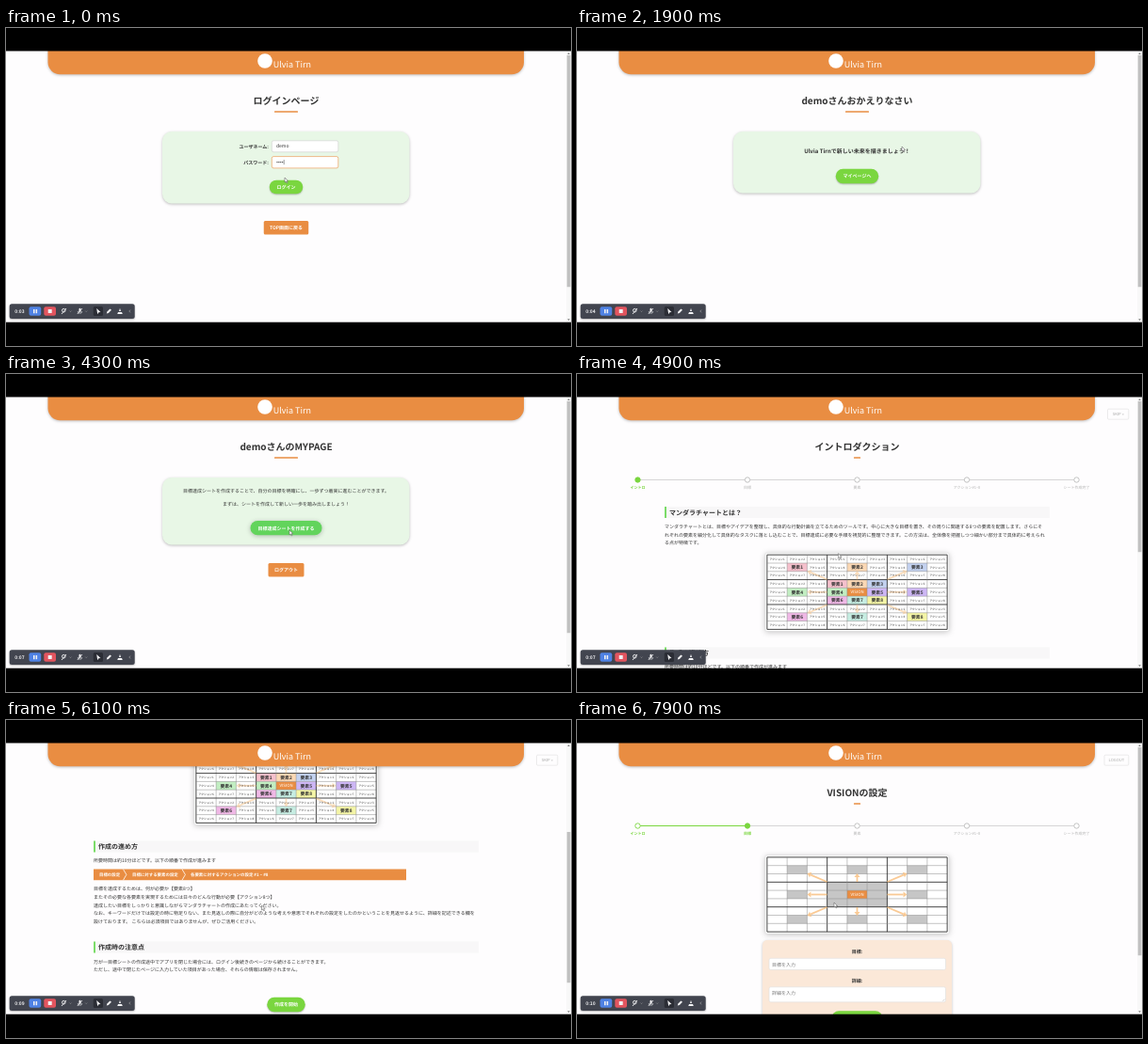
These frames come from a looping animation (600 px wide and 338 px high, 8000 ms). An HTML page with a canvas:

```html
<!DOCTYPE html>
<html>
<head>
<meta charset="utf-8">
<title>Goal sheet walkthrough</title>
<style>
  html, body { margin: 0; width: 100%; height: 100%; overflow: hidden; background: #000; }
  canvas { display: block; width: 600px; height: 338px; }
</style>
</head>
<body>
<canvas id="stage"></canvas>
<script>
const LOOP = 8000, STEP = 100, MID = 297.5;
const VIEW = { top: 24.5, bottom: 312.7, height: 288 };
const FONT = '"Noto Sans CJK JP", "Noto Sans CJK", "Noto Sans", sans-serif';
const INK = '#333', ORANGE = '#e98d42', GREEN = '#7ad63f', HOVER = '#62d45c', GREY = '#b5b5b5';
const BRAND = 'Ulvia Tirn', USER = 'demo';

const canvas = document.getElementById('stage');
const ratio = window.devicePixelRatio || 1;
canvas.width = 600 * ratio;
canvas.height = 338 * ratio;
const ctx = canvas.getContext('2d');
ctx.scale(ratio, ratio);
ctx.textBaseline = 'middle';
ctx.textRendering = 'geometricPrecision';

// Rows of [time, value, value...], linear in between
const CURSOR = [
  [0, 296, 159], [300, 297, 167], [700, 297, 167], [1900, 345, 126], [2300, 300, 157],
  [2800, 300, 157], [3600, 301, 166], [4500, 301, 166], [5000, 271.5, 197],
  [6800, 271.5, 197], [7200, 292, 251], [7500, 292, 251], [7800, 273, 194]
];
const SCROLL = [
  [4900, 0], [5100, 93], [5400, 93], [5600, 125], [5800, 125], [6100, 162], [6500, 212]
];

function sample(keys, t) {
  const next = keys.findIndex(k => k[0] > t);
  if (next < 0) return keys[keys.length - 1].slice(1);
  if (next === 0) return keys[0].slice(1);
  const a = keys[next - 1], b = keys[next], f = (t - a[0]) / (b[0] - a[0]);
  return a.slice(1).map((v, i) => v + (b[i + 1] - v) * f);
}

let cursor, scroll;

function label(s, x, y, size = 5, weight = 500, color = INK, align = 'left') {
  ctx.font = `${weight} ${size}px ${FONT}`;
  ctx.fillStyle = color;
  ctx.textAlign = align;
  ctx.fillText(s, x, y);
}
const centered = (s, y, size, weight, color, x = MID) => label(s, x, y, size, weight, color, 'center');

function box(x, y, w, h, r, fill, { stroke, shadow = 0, line = 0.6 } = {}) {
  ctx.save();
  ctx.beginPath();
  ctx.roundRect(x, y, w, h, r);
  if (shadow) {
    ctx.shadowColor = 'rgba(0,0,0,.25)';
    ctx.shadowBlur = shadow * ratio;
    ctx.shadowOffsetY = ratio;
  }
  ctx.fillStyle = fill;
  ctx.fill();
  ctx.restore();
  if (stroke) {
    ctx.strokeStyle = stroke;
    ctx.lineWidth = line;
    ctx.stroke();
  }
}

function path(points, color, width, fill) {
  ctx.beginPath();
  points.forEach(([x, y]) => ctx.lineTo(x, y));
  if (fill) {
    ctx.closePath();
    ctx.fillStyle = fill;
    ctx.fill();
  }
  if (color) {
    ctx.strokeStyle = color;
    ctx.lineWidth = width;
    ctx.stroke();
  }
}

function circle(x, y, r, fill, stroke) {
  ctx.beginPath();
  ctx.arc(x, y, r, 0, Math.PI * 2);
  ctx.fillStyle = fill;
  ctx.fill();
  if (stroke) {
    ctx.strokeStyle = stroke;
    ctx.lineWidth = 0.9;
    ctx.stroke();
  }
}

function pill(s, y, w, h = 15.3) {
  const over = Math.abs(cursor[0] - MID) < w / 2 && Math.abs(cursor[1] + scroll - y) < h / 2;
  box(MID - w / 2, y - h / 2, w, h, h / 2, over ? HOVER : GREEN, { shadow: over ? 5 : 1.5 });
  centered(s, y, 5, 700, '#fff');
}

function backButton(s, y, w) {
  box(MID - w / 2, y - 7.2, w, 14.4, 1.5, ORANGE);
  centered(s, y, 5, 700, '#fff');
}

function title(s, age) {
  centered(s, 77, 10, 700);
  const w = 25 * Math.min(1, age / 1400);
  box(MID - w / 2, 88.2, w, 1.6, 0.5, ORANGE);
}

const panel = h => box(166, 110, 262.5, h, 10, '#e8f7e6', { shadow: 3 });

function input(x, y, w, h, stroke = '#ccc') {
  box(x, y, w, h, 1.8, '#fff', { stroke });
}

function stepper(active) {
  const names = ['イントロ', '目標', '要素', 'アクション#1~8', 'シート作成完了'];
  const xs = names.map((_, i) => 64.5 + i * 116.5);
  xs.slice(1).forEach((x, i) =>
    path([[xs[i], 112.5], [x, 112.5]], i < active ? GREEN : '#ccc', i < active ? 1.2 : 0.8));
  names.forEach((name, i) => {
    const color = i <= active ? GREEN : '#bbb';
    circle(xs[i], 112.5, 2.7, i === active ? GREEN : '#fff', color);
    centered(name, 120.8, 4, i <= active ? 700 : 500, i <= active ? GREEN : GREY, xs[i]);
  });
}

// 9 x 9 goal chart centred on MID, cy
function chart(cy, filled) {
  const tints = ['#f5c0cc', '#fbd8b4', '#c3d2f0', '#c2eec2', '#cdb6f5', '#f0b8e6', '#c6ede2', '#f4f5a6'];
  const cw = 21.25, ch = 8.8, left = MID - 4.5 * cw, top = cy - 4.5 * ch;
  box(200, cy - 41.5, 195, 83, 1, '#fff', { shadow: 6, stroke: '#ddd' });

  const cells = [];
  for (let row = 0; row < 9; row++) for (let col = 0; col < 9; col++) {
    const block = Math.floor(row / 3) * 3 + Math.floor(col / 3);
    const spot = row % 3 * 3 + col % 3;
    const place = block === 4 ? spot : spot === 4 ? block : -1;
    const x = left + col * cw, y = top + row * ch;
    const n = place > 4 ? place : place + 1;
    cells.push({ x: x + cw / 2, y: y + ch / 2, spot, place, n });
    if (place < 0) continue;
    ctx.fillStyle = place === 4 ? ORANGE : filled ? tints[n - 1] : '#c6c6c6';
    ctx.fillRect(x, y, cw, ch);
  }
  for (let i = 0; i <= 9; i++) {
    const color = i % 3 ? '#888' : '#333', width = i % 3 ? 0.5 : 0.9;
    path([[left + i * cw, top], [left + i * cw, top + 9 * ch]], color, width);
    path([[left, top + i * ch], [left + 9 * cw, top + i * ch]], color, width);
  }

  ctx.globalAlpha = filled ? 0.55 : 0.9;
  for (let dx = -1; dx <= 1; dx++) for (let dy = -1; dy <= 1; dy++)
    if (dx || dy) arrow(MID + dx * 32, cy + dy * 13.5, MID + dx * 53, cy + dy * 22.5);
  ctx.globalAlpha = 1;

  for (const { x, y, spot, place, n } of cells) {
    if (place === 4) centered('VISION', y, 4.4, 500, '#fff', x);
    else if (filled && place >= 0) centered('要素' + n, y, 4.8, 700, INK, x);
    else if (filled) centered('アクション' + (spot > 4 ? spot : spot + 1), y, 3, 500, INK, x);
  }
}

function arrow(x1, y1, x2, y2) {
  const a = Math.atan2(y2 - y1, x2 - x1), c = Math.cos(a), s = Math.sin(a);
  const bx = x2 - 4 * c, by = y2 - 4 * s;
  path([[x1, y1], [bx, by]], '#f9c489', 1.8);
  path([[x2, y2], [bx - 3 * s, by + 3 * c], [bx + 3 * s, by - 3 * c]], null, 0, '#f9c489');
}

function heading(s, y) {
  box(93, y - 6, 409, 12, 0, '#f8f7f8');
  box(93, y - 6, 2, 12, 0, '#7bdc68');
  label(s, 98, y, 7, 700);
}

const lines = (rows, y) => rows.forEach((s, i) => label(s, 93, y + i * 8.65));

function login(age) {
  title('ログインページ', age);
  panel(76.5);
  label('ユーザネーム:', 279, 125.6, 5, 700, INK, 'right');
  input(282.3, 119.8, 70.5, 12);
  label(USER, 287, 125.4, 5, 400);
  label('パスワード:', 279, 142.7, 5, 700, INK, 'right');
  input(282.3, 136.6, 70.5, 12.3, ORANGE);
  for (let i = 0; i < 4; i++) circle(288 + i * 1.9, 142.6, 0.7, INK);
  path([[295.2, 140], [295.2, 145.2]], INK, 0.5);
  pill('ログイン', 169, 35.5, 14.6);
  backButton('TOP画面に戻る', 212.2, 47.5);
}

function welcome(age) {
  title(USER + 'さんおかえりなさい', age);
  panel(65.5);
  centered(BRAND + 'で新しい未来を描きましょう！', 130.3, 6, 700);
  pill('マイページへ', 157.5, 45.5);
}

function myPage(age) {
  title(USER + 'さんのMYPAGE', age);
  panel(71.5);
  centered('目標達成シートを作成することで、自分の目標を明確にし、一歩ずつ着実に進むことができます。', 123.7);
  centered('まずは、シートを作成して新しい一歩を踏み出しましょう！', 138.4);
  pill('目標達成シートを作成する', 163.7, 76);
  backButton('ログアウト', 208.2, 38);
}

function intro(age) {
  title('イントロダクション', age);
  stepper(0);
  heading('マンダラチャートとは？', 147);
  lines([
    'マンダラチャートとは、目標やアイデアを整理し、具体的な行動計画を立てるためのツールです。中心に大きな目標を置き、その周りに関連する8つの要素を配置します。さらにそ',
    'れぞれの要素を細分化して具体的なタスクに落とし込むことで、目標達成に必要な手順を視覚的に整理できます。この方法は、全体像を把握しつつ細かい部分まで具体的に考えられ',
    'る点が特徴です。'
  ], 162.2);
  chart(231.8, true);

  heading('作成の進め方', 296.4);
  label('所要時間は約10分ほどです。以下の順番で作成が進みます', 93, 311.5);
  box(93, 320.6, 332, 11.6, 0, ORANGE);
  [['目標の設定', 99], ['目標に対する要素の設定', 134], ['各要素に対するアクションの設定 #1 ~ #8', 196]]
    .forEach(([s, x]) => label(s, x, 326.5, 4.45, 700, '#fff'));
  [124.5, 187].forEach(x => path([[x, 320.6], [x + 3.4, 326.4], [x, 332.2]], '#fff', 0.8));
  lines([
    '目標を達成するためは、何が必要か【要素8つ】',
    'またその必要な各要素を実現するためには日々のどんな行動が必要【アクション8つ】',
    '達成したい目標をしっかりと意識しながらマンダラチャートの作成にあたってください。',
    'なお、キーワードだけでは設定の時に物足りない、また見返しの際に自分がどのような考えや意思でそれぞれの設定をしたのかということを見返せるように、詳細を記述できる欄を',
    '設けております。 こちらは必須項目ではありませんが、ぜひご活用ください。'
  ], 341.3);

  heading('作成時の注意点', 403.5);
  lines([
    '万が一目標シートの作成途中でアプリを閉じた場合には、ログイン後続きのページから続けることができます。',
    'ただし、途中で閉じたページに入力していた項目があった場合、それらの情報は保存されません。'
  ], 418.6);
  pill('作成を開始', 464.5, 40.5);
  backButton('前のページへ戻る', 492.2, 53);

  box(0, 509, 595, 17, 0, '#c26136');
  centered(`© 2024 ${BRAND}. All rights reserved.`, 517, 4.4, 700, '#fff');
}

function goalForm(age) {
  title('VISIONの設定', age);
  stepper(1);
  chart(185.5, false);
  box(197, 234, 201, 110, 5, '#fbe8d8', { shadow: 3 });
  centered('目標:', 246.5, 5, 700);
  input(204, 253.3, 187.5, 12.2, '#ddd');
  label('目標を入力', 207, 259.6, 5, 400, '#777');
  centered('詳細:', 276.6, 5, 700);
  input(204, 283.8, 187.5, 16, '#ddd');
  label('詳細を入力', 207, 289.8, 5, 400, '#777');
  path([[388.5, 298.8], [390.6, 296.7]], '#888', 0.4);
  pill('次へ進む', 317, 54);
}

const PAGES = [
  { start: -2000, draw: login, height: 325 },
  { start: 500, draw: welcome, height: 325 },
  { start: 2600, draw: myPage, height: 325 },
  { start: 4500, draw: intro, height: 500, corner: ['SKIP »', 563.5] },
  { start: 7500, draw: goalForm, height: 362, corner: ['LOGOUT', 560] }
];

function header() {
  box(44.5, 20, 505.5, 29.3, [0, 0, 13, 13], ORANGE, { shadow: 3 });
  circle(275, 35, 7.8, '#fff');
  label(BRAND, 283.8, 38.3, 9, 400, '#fff');
}

function cornerButton([s, x]) {
  box(x, 37.2, 585.8 - x, 11, 1.2, '#fefdfe', { stroke: '#d8d8d8', line: 0.5 });
  centered(s, 42.9, 4.2, 500, '#aaa', (x + 585.8) / 2);
}

function scrollbar(height) {
  const track = 278, top = 29;
  box(595, VIEW.top, 5, VIEW.height, 0, '#f8f8f8');
  box(595.7, top + scroll / height * track, 3.7, VIEW.height / height * track, 0, '#c1c1c1');
  path([[596.2, 28], [597.5, 26.3], [598.8, 28]], null, 0, '#777');
  path([[596.2, 309.3], [597.5, 311], [598.8, 309.3]], null, 0, '#777');
}

function toolbar(t) {
  const white = '#f2f2f4';
  box(3.7, 293.2, 133, 15.8, 2.5, '#42454f', { shadow: 2 });
  label('0:' + String(3 + Math.floor(t / 1000)).padStart(2, '0'), 9.3, 301, 4.9, 700, white);
  box(24.5, 296.2, 12.7, 9.6, 2, '#4f82e4');
  [29, 31.6].forEach(x => box(x, 299, 1.5, 4.2, 0, white));
  box(40.3, 296.2, 12.7, 9.6, 2, '#e2555f');
  box(44.7, 299.1, 4, 3.9, 0.5, white);

  circle(61.3, 300.2, 1.8, '#42454f', white);
  path([[59, 304], [64, 298]], white, 0.9);
  box(77.5, 297.8, 2, 4.2, 1, white);
  path([[76.2, 301], [77, 303], [80, 303], [80.8, 301]], white, 0.6);
  path([[75.8, 304], [81, 298]], white, 0.8);
  [68.5, 85.2].forEach(x => path([[x - 1, 300.6], [x, 301.6], [x + 1, 300.6]], '#aaa', 0.5));

  box(92.8, 296, 10.2, 10, 1.5, '#2b2d35');
  path([[96.2, 298], [100.5, 302], [98.4, 302.3], [97.2, 304.3]], null, 0, white);
  path([[106.8, 303.6], [107.4, 301.6], [110.4, 298.4], [112, 299.8], [108.8, 303]], null, 0, white);
  path([[121, 297.8], [122, 301], [120, 301]], null, 0, white);
  path([[119, 302], [123, 302], [123.8, 304], [118.2, 304]], null, 0, white);
  path([[132, 299.6], [130.8, 301], [132, 302.4]], '#bbb', 0.6);
}

function pointer([x, y]) {
  const shape = [[0, 0], [0, 5], [1.2, 4], [2.1, 5.9], [3, 5.5], [2.1, 3.7], [3.7, 3.6], [0, 0]];
  path(shape.map(([dx, dy]) => [x + dx, y + dy]), '#666', 0.6, '#fff');
}

function draw(t) {
  const page = PAGES.filter(p => p.start <= t).pop();
  cursor = sample(CURSOR, t);
  scroll = page.draw === intro ? sample(SCROLL, t)[0] : 0;

  ctx.fillStyle = '#fefdfe';
  ctx.fillRect(0, 0, 600, 338);
  ctx.save();
  ctx.translate(0, -scroll);
  page.draw(t - page.start);
  ctx.restore();

  header();
  if (page.corner) cornerButton(page.corner);
  scrollbar(page.height);
  pointer(cursor);
  toolbar(t);
  ctx.fillStyle = '#000';
  ctx.fillRect(0, 0, 600, VIEW.top);
  ctx.fillRect(0, VIEW.bottom, 600, 338 - VIEW.bottom);
}

const begin = performance.now();
function tick() {
  const t = (performance.now() - begin) % LOOP;
  draw(Math.floor(t / STEP) * STEP);
  requestAnimationFrame(tick);
}
tick();
</script>
</body>
</html>
```
